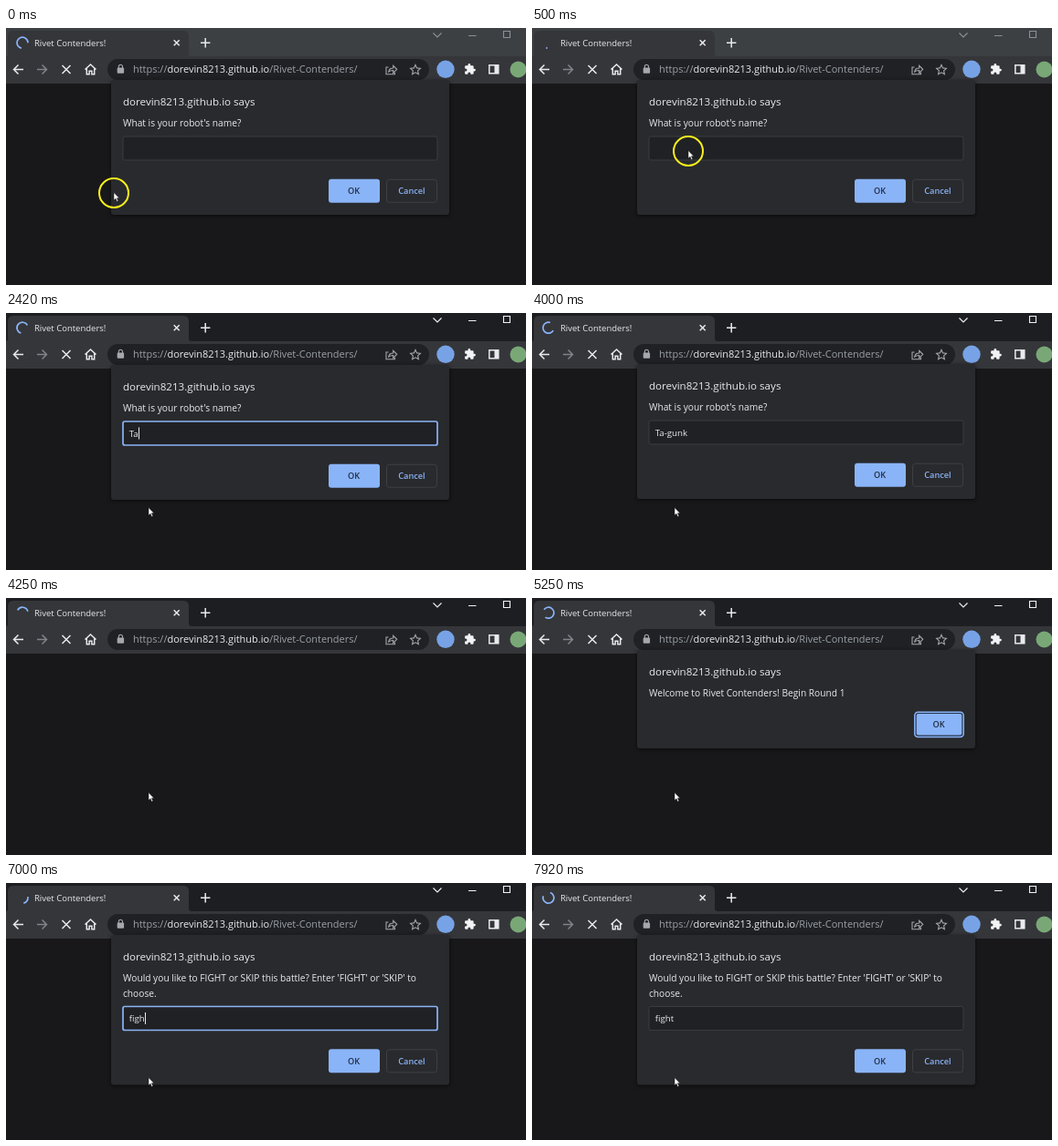
Animation, 569 px wide and 282 px high, one loop 8 s. Source, as an HTML page:

```html
<!DOCTYPE html>
<html lang="en">
<head>
<meta charset="utf-8">
<title>Robot prompt</title>
<style>
  html, body { margin: 0; width: 100%; height: 100%; overflow: hidden; background: #18171a; }
  svg { display: block; width: 100%; height: 100%; }
  text { font: 10.2px "Open Sans", "Noto Sans", sans-serif; fill: #e8eaed; white-space: pre; }
  .icon { fill: none; stroke: #e8eaed; stroke-width: 1.5; }
  .soft { stroke: #a4a7ab; stroke-width: 1.1; }
  .heading { font-size: 11.6px; }
  .url { font-size: 10.97px; fill: #9aa0a6; }
  .url tspan { fill: #e8eaed; }
  .tab { font-size: 9.5px; }
  .value { font-size: 9.7px; }
  .button { font-size: 9.2px; font-weight: 600; text-anchor: middle; fill: #8ab4f8; }
  .button.dark { fill: #202c40; }
  .panel { fill: #292a2d; filter: drop-shadow(0 1px 2px #0009); }
</style>
</head>
<body>
<svg viewBox="0 0 569 282">
  <rect width="569" height="282" fill="#18171a"/>
  <rect id="frame" width="569" height="32"/>
  <path fill="#35363a" d="M0 31Q2 31 2 28V9Q2 3 8 3H194Q200 3 200 9V28Q200 31 203 31H569V61H0Z"/>
  <path id="throbber" fill="none" stroke="#8ab4f8" stroke-width="1.7"/>
  <text class="tab" x="31" y="19.7">Rivet Contenders!</text>
  <path class="icon" stroke-width="1.3" d="M183.7 13.2l6 6m0-6l-6 6M213 16.3h10.4m-5.2-5.2v10.4"/>
  <path id="controls" class="icon" style="stroke-width:1.1" d="M467.5 5.5l4.5 4.5 4.5-4.5M506 8.5h8.5M544.5 3.5h7v7h-7z"/>

  <path class="icon" d="M19 45.5H8.5m5-5l-5 5 5 5M61.5 41l9 9m0-9l-9 9"/>
  <path class="icon" style="stroke:#808388" d="M34 45.5h10.5m-5-5l5 5-5 5"/>
  <path class="icon" d="M86.5 45.5l6-5.5 6 5.5M88.3 44.5v6.3h2.8v-3.6h2.8v3.6h2.8v-6.3"/>
  <rect x="111" y="34" width="352" height="23" rx="11.5" fill="#202124"/>
  <rect x="121.7" y="43.5" width="7.4" height="6.2" rx="1" fill="#a4a7ab"/>
  <path class="icon soft" d="M123.3 44v-1.7a2.1 2.1 0 0 1 4.2 0v1.7"/>
  <text class="url" x="139" y="49.4">https://<tspan>dorevin8213.github.io</tspan>/Rivet-Contenders/</text>
  <path class="icon soft" d="M418.5 43h-2.5v7.7h9.5v-2M418.7 48q.5-4 5-4v-2.7l4 4-4 4v-2.8q-3.3 0-5 1.5z"/>
  <path class="icon soft" d="M448 40.4l1.6 3.5 3.8.4-2.8 2.6.8 3.8-3.4-1.9-3.4 1.9.8-3.8-2.8-2.6 3.8-.4z"/>
  <circle cx="481" cy="45.3" r="9.7" fill="#77a3e6"/>
  <path fill="#f1f3f4" transform="translate(501 38.5) scale(.56)" d="M20.5 11H19V7a2 2 0 0 0-2-2h-4V3.5a2.5 2.5 0 0 0-5 0V5H4a2 2 0 0 0-2 2v3.8h1.5a2.7 2.7 0 0 1 0 5.4H2V20a2 2 0 0 0 2 2h3.8v-1.5a2.7 2.7 0 0 1 5.4 0V22H17a2 2 0 0 0 2-2v-4h1.5a2.5 2.5 0 0 0 0-5z"/>
  <rect class="icon" x="528.8" y="40.8" width="10" height="9"/>
  <path fill="#e8eaed" d="M534.5 41h4.5v9h-4.5z"/>
  <circle cx="560.5" cy="45.5" r="9" fill="#79a876"/>

  <g id="dialogs"></g>
  <g id="cursor">
    <circle id="ring" r="16" fill="none" stroke="#f8f01c" stroke-width="2"/>
    <path d="M0 -.5V8l2-1.8L3.4 9.4l1.4-.6L3.4 5.7H6z" fill="#fff" stroke="#111" stroke-width=".5"/>
  </g>
</svg>
<script>
const LOOP = 8000, CLICK = 580, BLINK = 500;
const $ = id => document.getElementById(id);

// Each dialog is open from `open` to `close`; its field has focus from `focus` to `blur`.
const dialogs = [
  { open: 0, close: 4120, focus: CLICK, blur: 3900, bottom: 205, lines: ["What is your robot's name?"],
    typed: "Ta-gunk", keys: [2080, 2250, 2600, 2760, 2920, 3080, 3250] },
  { open: 4280, close: 5330, bottom: 165, lines: ["Welcome to Rivet Contenders! Begin Round 1"] },
  { open: 5410, close: LOOP, focus: 5410, blur: 7900, bottom: 221.5,
    lines: ["Would you like to FIGHT or SKIP this battle? Enter 'FIGHT' or 'SKIP' to", "choose."],
    typed: "fight", keys: [6420, 6580, 6830, 7000, 7170] }
];

const rect = (x, y, w, h, rx, attrs) =>
  `<rect x="${x}" y="${y}" width="${w}" height="${h}" rx="${rx}" ${attrs}/>`;
const label = (x, y, text, cls = "") => `<text x="${x}" y="${y}" class="${cls}">${text}</text>`;

function dialogMarkup({ bottom, lines, typed }) {
  const top = bottom - 39.2;
  const body = rect(115, 57, 370, bottom - 57, 3, 'class="panel"') +
    label(128, 85, "dorevin8213.github.io says", "heading") +
    lines.map((line, i) => label(128, 108 + 16.5 * i, line)).join("");
  if (!typed) {
    return body + rect(418.8, top - .6, 53.4, 27.2, 3.5, 'fill="#24344f" stroke="#8ab4f8" stroke-width="1.5"') +
      rect(420.7, top + 1.3, 49.6, 23.4, 2, 'fill="#8ab4f8"') +
      label(445, top + 16.3, "OK", "button dark");
  }
  const field = bottom - 86;
  return body +
    rect(128, field, 344, 26, 2, 'class="field" fill="#202124"') +
    label(134.7, field + 16.6, "", "value") +
    rect(0, field + 6.5, 1, 13, 0, 'class="caret" fill="#e8eaed"') +
    rect(353, top, 56, 26, 3, 'fill="#8ab4f8"') + label(380.5, top + 16.2, "OK", "button dark") +
    rect(416.5, top + .5, 55, 25, 3, 'fill="none" stroke="#3c4043"') +
    label(444, top + 16.2, "Cancel", "button");
}

for (const dialog of dialogs) {
  dialog.node = document.createElementNS("http://www.w3.org/2000/svg", "g");
  dialog.node.innerHTML = dialogMarkup(dialog);
  $("dialogs").append(dialog.node);
}

function drawDialog(d, t) {
  const visible = t >= d.open && t < d.close;
  d.node.style.display = visible ? "" : "none";
  if (!visible || !d.typed) return;
  const focused = t >= d.focus && t < d.blur;
  const pressed = d.keys.filter(key => key <= t);
  const part = cls => d.node.querySelector("." + cls);
  const value = part("value"), caret = part("caret"), field = part("field");
  value.textContent = d.typed.slice(0, pressed.length);
  caret.setAttribute("x", 135 + (pressed.length ? value.getComputedTextLength() : 0));
  const idle = t - (pressed.at(-1) ?? d.focus);
  caret.style.display = focused && idle % (2 * BLINK) < BLINK ? "" : "none";
  field.setAttribute("stroke", focused ? "#8ab4f8" : "#3a3c40");
  field.setAttribute("stroke-width", focused ? 1.7 : 1);
  d.node.setAttribute("transform", `translate(0 ${t > d.blur + 80 ? -1 : 0})`);
}

const clamp = x => Math.min(1, Math.max(0, x));
const ease = x => x * x * (3 - 2 * x);

function drawCursor(t) {
  const toField = ease(clamp((t - 40) / 460)), away = ease(clamp((t - 700) / 450));
  const x = 118 + 53 * toField - 15 * away;
  const y = 181 - 46 * toField + 79 * away;
  $("cursor").setAttribute("transform", `translate(${x} ${y})`);
  $("ring").style.display = t < 2000 ? "" : "none";
}

// An arc that grows and shrinks by 270 degrees while it turns.
function drawThrobber(t) {
  const elapsed = t + 2744, half = 2000 / 3, maxArc = 270;
  const step = Math.floor(elapsed / half);
  let sweep = maxArc * ease(elapsed / half % 1) - (step % 2 ? 0 : maxArc);
  if (Math.abs(sweep) < 8) sweep = sweep < 0 ? -8 : 8;
  const start = 270 + 360 * elapsed / 1568 + maxArc * (Math.floor(step / 2) % 4);
  const point = deg => {
    const a = deg * Math.PI / 180;
    return `${18 + 6 * Math.cos(a)} ${16.2 + 6 * Math.sin(a)}`;
  };
  $("throbber").setAttribute("d",
    `M${point(start)}A6 6 0 ${+(Math.abs(sweep) > 180)} ${+(sweep > 0)} ${point(start + sweep)}`);
}

function draw(now) {
  const t = now % LOOP, active = t >= CLICK;
  $("frame").setAttribute("fill", active ? "#1d1e22" : "#3c4043");
  $("controls").style.stroke = active ? "#f1f3f4" : "#8d9095";
  dialogs.forEach(dialog => drawDialog(dialog, t));
  drawCursor(t);
  drawThrobber(t);
}

const begin = performance.now();
function tick() {
  draw(performance.now() - begin);
  requestAnimationFrame(tick);
}
tick();
</script>
</body>
</html>
```
